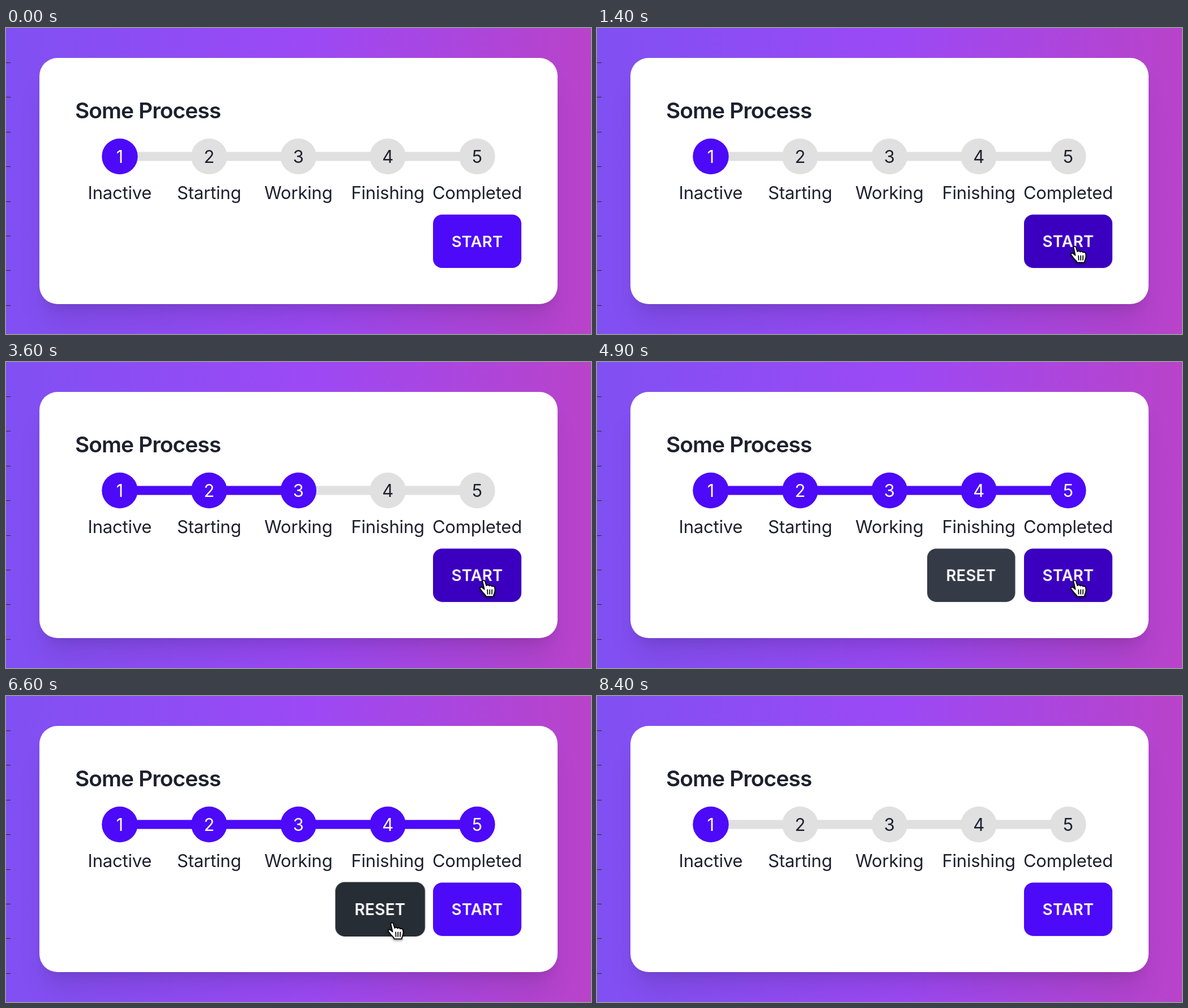
These frames come from a looping animation (1033x542 px, 8600 ms). An HTML page:

```html
<!DOCTYPE html>
<html lang="en">
<head>
<meta charset="utf-8">
<title>Some Process</title>
<style>
  html, body { margin: 0; width: 100%; height: 100%; overflow: hidden; }
  body {
    position: relative;
    background: linear-gradient(90deg, #8050f2, #9c49f5 52%, #b943c9);
    font-family: Inter, "Open Sans", sans-serif;
  }
  #card {
    position: absolute; left: 59px; top: 53px; width: 915px; height: 436px;
    border-radius: 32px; background: #fff;
    box-shadow: 0 40px 50px -10px #0000001a, 0 16px 20px -12px #0000001a;
  }
  svg { position: absolute; left: 0; top: 0; }
  text { fill: #1d212e; }
  .title { font-size: 38.8px; font-weight: 600; letter-spacing: -.9px; }
  .label, .num { font-size: 31px; text-anchor: middle; }
  .label { letter-spacing: -.2px; }
  .btn text { font-size: 27.5px; font-weight: 600; letter-spacing: .2px; text-anchor: middle; fill: #fff; }
  #cursor { filter: drop-shadow(0 2px 2px #0006); }
</style>
</head>
<body>
<div id="card"></div>
<svg id="stage" width="1033" height="542" viewBox="0 0 1033 542">
  <g id="ticks" fill="#16301f"></g>
  <text class="title" x="122" y="159.5">Some Process</text>
  <g id="steps"></g>
  <g id="reset" class="btn">
    <rect x="583" y="330.5" width="155.5" height="94.5" rx="16" fill="#343a46"/>
    <text x="660.5" y="388">RESET</text>
  </g>
  <g id="start" class="btn">
    <rect x="754" y="330.5" width="156" height="94.5" rx="16" fill="#4c0af8"/>
    <text x="832" y="388">START</text>
  </g>
  <g id="cursor">
    <g id="arrow">
      <path d="M0 0V26L6 20.500L10 30L14.500 28L10.500 18.800H18.500Z" fill="#000" stroke="#fff" stroke-width="2" stroke-linejoin="round"/>
    </g>
    <g id="hand" transform="translate(-8 -2)" stroke="#000" stroke-linecap="round" stroke-linejoin="round">
      <path fill="#fff" stroke-width="1.800" d="M5.600 4.200C5 1.600 9 .6 9.800 3.200L12.400 11.200C13 9.600 16.600 9.400 17.200 11.600C18.400 10 21.600 10.400 22 12.600C23.600 11.400 26.600 12 27 14.600C27.800 18 28 20.600 26.800 23.600C26 25.600 25 26.600 24.800 30.400H11.600C11 27.400 8.400 25.800 5.800 22.800C4 20.600 2.800 18.600 1.400 17C-.4 14.400 3 12.600 5.400 14.800L8.600 17.600Z"/>
      <path fill="none" stroke-width="1.700" d="M14.200 18.300L14.500 26M18.200 18.300V26M22.200 18.300L22 26"/>
    </g>
  </g>
</svg>
<script>
const LOOP = 8600;
const PRIMARY = '#4c0af8', PRIMARY_HOVER = '#3b00bf';
const NEUTRAL = '#343a46', NEUTRAL_HOVER = '#272d35';
const GREY = '#e0e0e0', INK = '#1d212e';
const RESET_AT = 6650;
const LABELS = ['Inactive', 'Starting', 'Working', 'Finishing', 'Completed'];
const ACTIVE_AT = [0, 1800, 2850, 3880, 4868];

const $ = id => document.getElementById(id);

function add(parent, tag, attrs, text) {
  const el = document.createElementNS('http://www.w3.org/2000/svg', tag);
  for (const key in attrs) el.setAttribute(key, attrs[key]);
  if (text) el.textContent = text;
  parent.append(el);
  return el;
}

// keys: [ms, value, easing towards the next key]
function track(el, prop, keys, easing = 'linear') {
  const all = [...keys];
  if (all[0][0] > 0) all.unshift([0, all[0][1]]);
  const last = all[all.length - 1];
  if (last[0] < LOOP) all.push([LOOP, last[1]]);
  const frames = all.map(([ms, value, ease]) =>
    ({ offset: ms / LOOP, [prop]: value, easing: ease || easing }));
  el.animate(frames, { duration: LOOP, iterations: Infinity }).startTime = 0 + origin;
}

const hold = (el, prop, keys) => track(el, prop, keys, 'steps(1, end)');

// Button pop after a release
const pop = ms => [
  [ms, 'scale(.98)', 'ease-out'],
  [ms + 100, 'scale(1.02)', 'ease-out'],
  [ms + 250, 'scale(1)']
];

const press = (down, up) => [
  [down, 'scale(1)'],
  [down + 30, 'scale(.97)'],
  [up, 'scale(.97)'],
  ...pop(up)
];

const origin = performance.now();

for (let k = 1; k <= 8; k++)
  add($('ticks'), 'rect', { x: 0, y: Math.floor(61.4 * k), width: 8, height: 1 });

// Steps: all bars go below the circles
const centre = i => 200.9 + 157.75 * i;

function toggle(el, i, off, on) {
  el.style.fill = i ? off : on;
  if (i) hold(el, 'fill', [[0, off], [ACTIVE_AT[i], on], [RESET_AT, off]]);
}

for (let i = 1; i < LABELS.length; i++) {
  const bar = add($('steps'), 'rect',
    { x: centre(i - 1), y: 219.5, width: centre(i) - centre(i - 1), height: 16 });
  toggle(bar, i, GREY, PRIMARY);
}

LABELS.forEach((label, i) => {
  const x = centre(i);
  toggle(add($('steps'), 'circle', { cx: x, cy: 227.5, r: 31.7 }), i, GREY, PRIMARY);
  toggle(add($('steps'), 'text', { class: 'num', x, y: 239.3 }, String(i + 1)), i, INK, '#fff');
  add($('steps'), 'text', { class: 'label', x, y: 303 }, label);
});

// Buttons
$('start').style.transformOrigin = '832px 377.75px';
$('reset').style.transformOrigin = '660.75px 377.75px';
track($('start'), 'transform', press(1700, 1780));
track($('reset'), 'transform', [
  [4867, 'scale(.98)'],
  ...pop(4868),
  ...press(6430, 6500)
]);
hold($('reset'), 'opacity', [[0, 0], [4868, 1], [RESET_AT, 0]]);
track($('start').firstElementChild, 'fill', [
  [740, PRIMARY, 'ease-out'], [940, PRIMARY_HOVER],
  [6000, PRIMARY_HOVER, 'ease-out'], [6200, PRIMARY]
]);
track($('reset').firstElementChild, 'fill', [
  [6100, NEUTRAL, 'ease-out'], [6300, NEUTRAL_HOVER]
]);

// Pointer: [ms, x, y] of its hot spot
const PATH = [
  [100, 905, 560], [500, 872, 470], [740, 855, 425], [900, 849, 408], [1300, 844, 387],
  [5650, 844, 387], [5850, 800, 394], [6000, 754, 398], [6100, 738, 399], [6300, 700, 402],
  [6500, 682, 402], [7150, 682, 402], [7400, 600, 405], [7700, 320, 412], [7980, -40, 418]
];
track($('cursor'), 'transform', PATH.map(([ms, x, y]) => [ms, `translate(${x}px, ${y}px)`]));
const HAND = [[0, 0], [740, 1], [6000, 0], [6100, 1], [RESET_AT, 0]];
hold($('hand'), 'opacity', HAND);
hold($('arrow'), 'opacity', HAND.map(([ms, on]) => [ms, 1 - on]));
</script>
</body>
</html>
```
